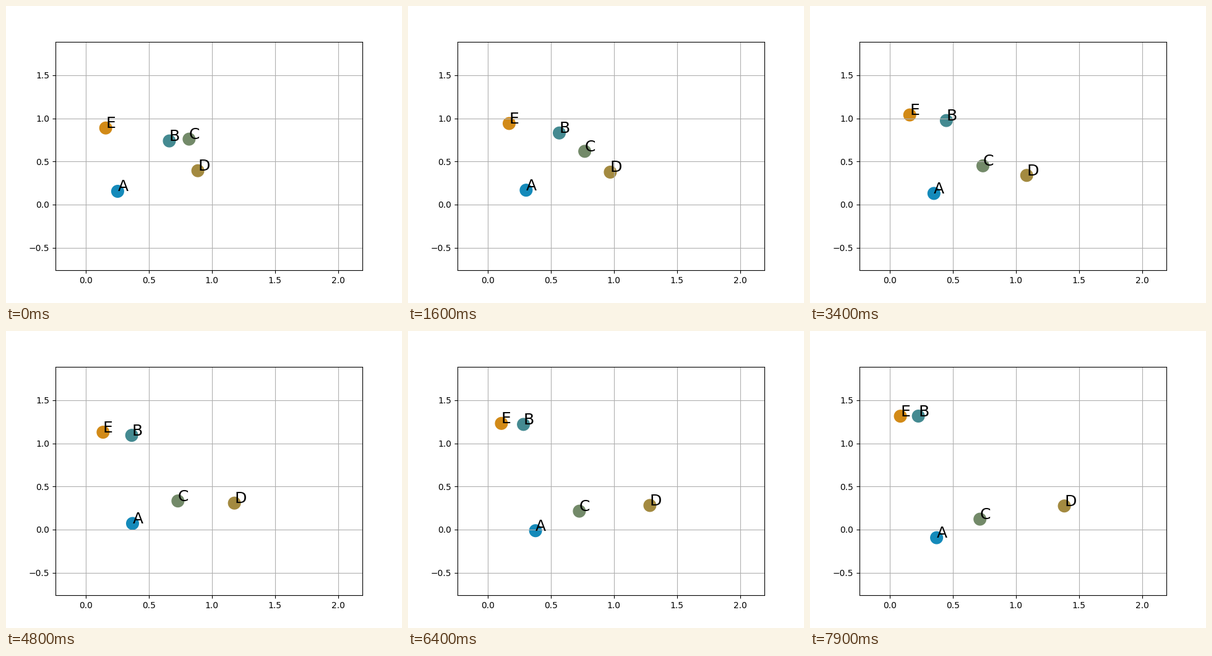
Animation of 640x480 px, one loop 8000 ms. Source, as a matplotlib script:

```python
import numpy as np
import matplotlib.pyplot as plt
from matplotlib.animation import FuncAnimation

FRAMES = 80
INTERVAL = 100
DRAG = 5.0               # per second: how fast the nodes get up to speed
CENTROID = 0.5558 + 0.5864j
NAMES = "ABCDE"
COLORS = np.linspace((0.080, 0.543, 0.729), (0.825, 0.543, 0.092), len(NAMES))

# Key places of A to D as x + yj; E balances them about the centroid
KEY_TIMES = np.array([0, 2.4, 4.8, 7.9])
KEYS = np.array([
    [0.2525 + 0.154j, 0.327 + 0.157j, 0.3705 + 0.071j, 0.371 - 0.094j],
    [0.662 + 0.738j, 0.513 + 0.892j, 0.364 + 1.093j, 0.2265 + 1.316j],
    [0.8185 + 0.759j, 0.751 + 0.541j, 0.730 + 0.332j, 0.7145 + 0.121j],
    [0.888 + 0.393j, 1.0205 + 0.361j, 1.1775 + 0.307j, 1.383 + 0.274j],
])


def glide(t):
    """Distance travelled at unit speed when starting from rest with drag."""
    return t - (1 - np.exp(-DRAG * t)) / DRAG


# One cubic per node, along the glide
CUBICS = np.linalg.solve(np.vander(glide(KEY_TIMES)), KEYS.T)


def positions(frame):
    z = np.polyval(CUBICS, glide(frame * INTERVAL / 1000))
    z = np.append(z, len(NAMES) * CENTROID - z.sum())
    return np.column_stack([z.real, z.imag])


fig, ax = plt.subplots(figsize=(6.4, 4.8), dpi=100)
ax.set_xlim(-0.2398, 2.1915)
ax.set_ylim(-0.7621, 1.8893)
ax.grid(True)

start = positions(0)
dots = ax.scatter(*start.T, s=200, c=COLORS)
labels = [ax.text(x, y, name, fontsize=18)
          for name, (x, y) in zip(NAMES, start)]


def update(frame):
    pos = positions(frame)
    dots.set_offsets(pos)
    for label, xy in zip(labels, pos):
        label.set_position(xy)
    return [dots, *labels]


anim = FuncAnimation(fig, update, frames=FRAMES, interval=INTERVAL,
                     repeat=True, repeat_delay=0)
plt.show()
```
